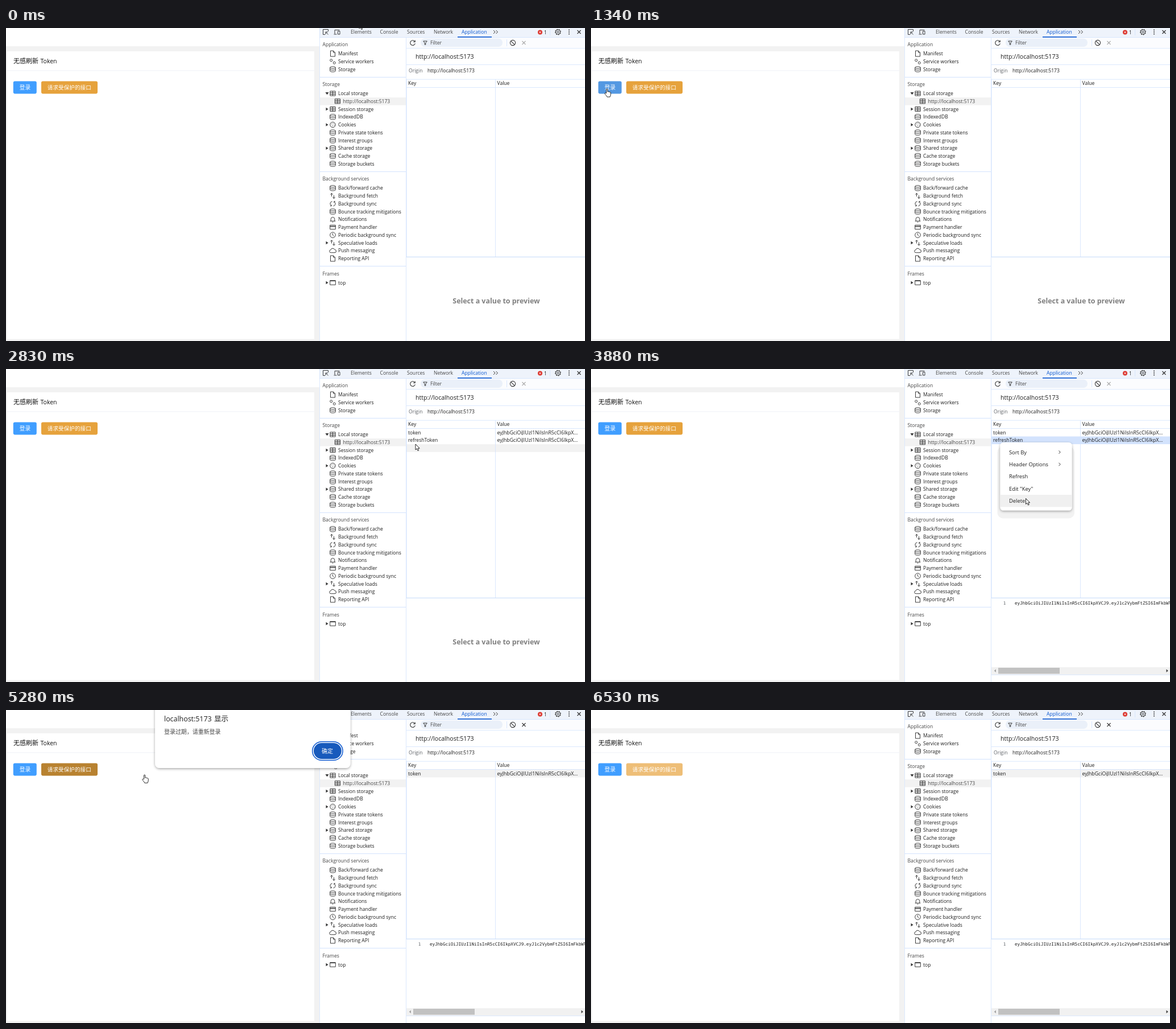
Write an HTML page that moves like this. It is 1018x550 px and loops after 6.97 s.

```html
<!DOCTYPE html>
<html lang="zh">
<head>
<meta charset="utf-8">
<title>Token refresh</title>
<style>
  html, body { margin: 0; width: 100%; height: 100%; overflow: hidden; background: #fff; }
  svg { display: block; width: 100%; height: 100%; }
  text { font-family: 'Open Sans', 'Noto Sans CJK SC', 'Noto Sans CJK', sans-serif; white-space: pre; }
  .mono { font-family: 'DejaVu Sans Mono', 'Noto Sans Mono', monospace; }
</style>
</head>
<body>
<svg id="stage" viewBox="0 0 1018 550" xmlns="http://www.w3.org/2000/svg"></svg>
<script>
const LOOP = 6970;
const UI = 8.57, CODE = 7.63;
const INK = '#1f1f1f', MUTED = '#474747', LINE = '#d3e3fd', BLUE = '#0b57d0';
const HOST = 'http://localhost:5173';
const JWT = 'eyJhbGciOiJIUzI1NiIsInR5cCI6IkpXVCJ9.eyJ1c2VybmFtZSI6ImFkbWlu';

const rect = (x, y, w, h, fill, extra = '') =>
  `<rect x="${x}" y="${y}" width="${w}" height="${h}" fill="${fill}" ${extra}/>`;
const label = (x, y, str, size = UI, fill = INK, extra = '') =>
  `<text x="${x}" y="${y}" font-size="${size}" fill="${fill}" ${extra}>${str}</text>`;
const stroke = (x, y, d, color = '#3a3a3a', width = 1, extra = '') =>
  `<path transform="translate(${x} ${y})" d="${d}" fill="none" stroke="${color}" stroke-width="${width}" ${extra}/>`;
const solid = (x, y, d, fill = '#333') =>
  `<path transform="translate(${x} ${y})" d="${d}" fill="${fill}"/>`;
const group = (id, body) => `<g id="${id}">${body}</g>`;
const ring = r => `M${-r} 0a${r} ${r} 0 1 0 ${2 * r} 0a${r} ${r} 0 1 0 ${-2 * r} 0`;
const CROSS = 'M-3-3l6 6M3-3l-6 6';

const ICONS = {
  doc: 'M-4-5h5l3 3v7h-8zM1-5v3h3',
  gears: 'M-4.8-2a2 2 0 1 0 4 0a2 2 0 1 0-4 0M.8 2.5a2 2 0 1 0 4 0a2 2 0 1 0-4 0',
  db: 'M-4.8-3c0-2.2 9.6-2.2 9.6 0v6c0 2.2-9.6 2.2-9.6 0zM-4.8-3c0 2.2 9.6 2.2 9.6 0M-4.8 0c0 2.2 9.6 2.2 9.6 0',
  table: 'M-4.6-4h9.2v8h-9.2zM-4.6-1.3h9.2M-4.6 1.4h9.2M0-4v8',
  cookie: ring(4.7) + 'M-2-1.5h1.2M1-2h1.2M-1 1.8h1.2M2 1h1.2',
  arrows: 'M-2 1v-5.5M-4.2-2.4l2.2-2.2 2.2 2.2M2-1v5.5M-.2 2.4l2.2 2.2 2.2-2.2',
  sync: 'M-1-4A4 4 0 0 0-2.5 3.5M-4.5 4h2.2v-2.2M1 4A4 4 0 0 0 2.5-3.5M4.5-4h-2.2v2.2',
  bell: 'M-3.3 3v-3.5a3.3 3.3 0 0 1 6.6 0v3.5M-4.8 3h9.6M-1 4.8h2',
  card: 'M-4.8-3.6h9.6v7.2h-9.6zM-4.8-1.6h9.6M-4.8-1h9.6',
  clock: ring(4.8) + 'M0-3v3l2 2',
  cloud: 'M-3 3.5a2.5 2.5 0 0 1-.5-5a3.6 3.6 0 0 1 6.8-.2a2.6 2.6 0 0 1 .2 5.2z',
  frame: 'M-4.8-3.8h9.6v7.6h-9.6zM-4.8-3h9.6'
};

// Each section: heading, heading centre, first item centre, items as "icon|text|arrow"
const SECTIONS = [
  ['Application', 28.5, 45, ['doc|Manifest', 'gears|Service workers', 'db|Storage']],
  ['Storage', 98.8, 115, ['table|Local storage|open', `table|${HOST}|child`, 'table|Session storage|shut',
    'db|IndexedDB', 'cookie|Cookies|shut', 'db|Private state tokens', 'db|Interest groups',
    'db|Shared storage|shut', 'db|Cache storage', 'db|Storage buckets']],
  ['Background services', 265, 281.3, ['db|Back/forward cache', 'arrows|Background fetch', 'sync|Background sync',
    'db|Bounce tracking mitigations', 'bell|Notifications', 'card|Payment handler',
    'clock|Periodic background sync', 'arrows|Speculative loads|shut', 'cloud|Push messaging', 'doc|Reporting API']],
  ['Frames', 431.5, 447.5, ['frame|top|shut']]
];

function sidebarItem(item, y) {
  const [icon, name, kind] = item.split('|');
  const dx = kind === 'child' ? 8.4 : 0;
  let out = stroke(574.5 + dx, y, ICONS[icon]) +
    label(584 + dx, y + 3.1, name, UI, dx ? MUTED : INK);
  if (kind === 'open') out += solid(564.5, y, 'M-3-2h6l-3 4.2z');
  if (kind === 'shut') out += solid(564.5, y, 'M-2-2.8l4 2.8-4 2.8z');
  return out;
}

const sidebar = () => rect(552, 122, 151, 13.6, '#f2f2f2') +
  SECTIONS.map(([title, y, first, items]) =>
    label(556.5, y + 3, title, UI, MUTED) +
    items.map((item, i) => sidebarItem(item, first + i * 13.74)).join('')).join('') +
  [86, 252, 418].map(y => rect(552, y, 151, 1, LINE)).join('');

const page = () => rect(0, 0, 551, 550, '#fff') + rect(0, 32, 551, 518, '#f2f2f2') +
  rect(2, 41, 540, 505.5, '#fff') + rect(2, 74.5, 540, 0.8, '#ebeef5') +
  label(13, 62.3, '无感刷新', 11, '#111', 'font-weight="500"') +
  label(60.5, 62.2, 'Token', 10.5, '#111', 'font-weight="500"') +
  rect(12.8, 93.4, 41, 22, '#409eff', 'id="login" rx="2.8"') + label(23.8, 107.7, '登录', 9.7, '#fff') +
  rect(62, 93.4, 99, 22, '#e6a23c', 'id="request" rx="2.8"') + label(72.8, 107.7, '请求受保护的接口', 9.65, '#fff');

const tabs = () => rect(551, 0, 467, 16.5, '#eef3fb') + rect(551, 16, 467, 0.8, LINE) +
  stroke(562, 7, 'M4.5-1v-3.5h-9v9h3.5M0 0l4.5 4.5M0 4v-4h4') +
  stroke(582, 7, 'M-4 3v-6.5h8.5M-5.5 4h5M1.5-1.5h3.5v5.5h-3.5z') +
  [[606, 'Elements'], [657.5, 'Console'], [705, 'Sources'], [752, 'Network']]
    .map(([x, s]) => label(x, 10, s, UI, MUTED)).join('') +
  label(801, 10, 'Application', UI, BLUE) + rect(794, 15, 60, 1.6, BLUE) +
  stroke(861, 7, 'M-4-3l3 3-3 3M.5-3l3 3-3 3') +
  solid(939, 7.5, ring(4), '#dc362e') + stroke(939, 7.5, 'M-1.5-1.5l3 3M1.5-1.5l-3 3', '#fff') +
  label(946, 10.5, '1') + rect(956, 2, 0.8, 11, LINE) +
  stroke(970.5, 7, ring(4) + ring(1.5)) + stroke(970.5, 7, ring(4.8), '#3a3a3a', 1.2, 'stroke-dasharray="1.9 1.87"') +
  [3.5, 7, 10.5].map(y => solid(990, y, ring(1))).join('') +
  stroke(1007.5, 7, CROSS, '#333', 1.2);

const toolbar = () => rect(704, 17, 314, 18.5, '#fbfcfe') + rect(704, 35.5, 314, 0.8, LINE) +
  stroke(715, 26, 'M3.5-2.5A4.3 4.3 0 1 0 4.3 1M4.2-4.5v3h-3', '#333', 1.1) +
  rect(729, 18.5, 144, 14.5, '#eaf0f9', 'rx="7.2"') +
  stroke(737, 26, 'M-3.3-3h6.6l-2.5 3.2v3h-1.6v-3z') + label(746, 29, 'Filter', UI, MUTED) +
  rect(880, 20, 0.8, 12, LINE) + stroke(891, 26, ring(4.6) + 'M-3.2-3.2l6.4 6.4', '#333', 1.1) +
  stroke(910.5, 26, CROSS, '#aaa', 1.1, 'id="clear"') +
  label(720, 53.5, HOST, 10.6) + rect(704, 64, 314, 0.8, LINE) +
  label(708, 77.5, 'Origin', UI, '#5f6368') + label(741, 77.5, HOST);

const tableRow = (id, y, key) =>
  group(id, label(707, y, key) + label(863.5, y, JWT.slice(0, 32) + '...', 8.75));

const table = () => rect(704, 0, 314, 13.6, '#f2f2f2', 'id="rowFill"') +
  label(707, 100, 'Key') + label(863.5, 100, 'Value') +
  tableRow('tokenRow', 114.7, 'token') + tableRow('refreshRow', 128.4, 'refreshToken') +
  rect(704, 89.8, 314, 0.8, LINE) + rect(704, 104, 314, 0.8, LINE) +
  rect(860, 90, 0.8, 312, LINE) + rect(704, 90, 0.6, 312, LINE) +
  rect(704, 401.8, 314, 1, '#c4d9fb') + rect(703, 17, 0.8, 533, LINE) + rect(551, 0, 0.8, 550, LINE);

const preview = () =>
  group('hint', label(862, 483.5, 'Select a value to preview', 12.43, '#808080', 'font-weight="700" text-anchor="middle"')) +
  group('content', label(724.7, 414, '1', CODE, '#5f6368', 'class="mono"') +
    label(745, 414, JWT, CODE, INK, 'class="mono"') +
    rect(704, 524, 314, 13, '#f1f1f1') + rect(716, 525, 108, 10.5, '#c1c1c1') +
    solid(710, 530.3, 'M2-2.8v5.6l-3.3-2.8z', '#a3a3a3') + solid(1013, 530.3, 'M-1.5-2.8v5.6l3.3-2.8z', '#404040') +
    rect(704, 537, 314, 0.8, LINE));

const MENU = ['Sort By', 'Header Options', 'Refresh', 'Edit "Key"', 'Delete'];
const MENU_TOP = 135.4, MENU_STEP = 21.4;
const menu = () => group('menu',
  rect(714.5, 136, 135.5, 126.5, '#000', 'rx="10" opacity=".05"') +
  rect(719.5, 129, 126, 119.5, '#fff', 'rx="5.5" filter="url(#soft)"') +
  rect(719.5, 0, 126, MENU_STEP, '#f0f0f0', 'id="menuFill"') +
  MENU.map((s, i) => {
    const y = MENU_TOP + (i + 0.5) * MENU_STEP;
    return label(735, y + 3.5, s, 9.34) + (i < 2 ? stroke(824, y, 'M-1.5-2.7l2.7 2.7-2.7 2.7', '#333') : '');
  }).join(''));

const dialog = () => group('dialog',
  rect(262, -20, 343.5, 122, '#fff', 'rx="8" filter="url(#soft)"') +
  label(278, 20.2, 'localhost:5173', 12.4) + label(366, 20.4, '显示', 12.5) +
  label(278, 42.2, '登录过期，请重新登录', 9.95, MUTED) +
  rect(538.7, 55.7, 53.4, 32.6, '#fff', `rx="16.3" stroke="${BLUE}" stroke-width="1.5"`) +
  rect(541, 58, 48.8, 28, '#185abc', 'rx="14"') + label(555, 75.8, '确定', 10, '#fff'));

const CURSOR_STYLE = 'fill="#fff" stroke="#111" stroke-width=".9"';
const cursor = () => group('cursor',
  `<path id="arrow" d="M0 0V10L2.3 7.9L4 11.6L5.7 10.9L4.2 7.3H7.2Z" ${CURSOR_STYLE}/>` +
  `<path id="hand" d="M-1 8V1.4a1.1 1.1 0 0 1 2.2 0V5.6c.6-.9 1.8-.7 2 .3 .5-.6 1.6-.4 1.8.5 .7-.4 1.7 0 1.7 1V10.2c0 2-1 2.5-1.3 4.4H.2C-.2 12.6-3.5 10-3.7 8.7c-.2-1 .9-1.7 1.7-.8Z" ${CURSOR_STYLE}/>`);

const stage = document.getElementById('stage');
stage.innerHTML =
  `<defs><filter id="soft" x="-20%" y="-20%" width="140%" height="150%">
    <feDropShadow dx="0" dy="1.5" stdDeviation="2" flood-opacity=".36"/></filter></defs>` +
  page() + rect(551, 0, 467, 550, '#fff') + tabs() + sidebar() + toolbar() + table() + preview() +
  menu() + dialog() + cursor();

const el = {};
stage.querySelectorAll('[id]').forEach(node => { el[node.id] = node; });

// Pointer moves: start, end, number of steps, Bezier points
const MOVES = [
  [320, 1000, 15, [[621, -9], [720, 130], [230, 240], [30, 111]]],
  [1060, 1060, 1, [[30, 111], [28, 106.5]]],
  [1610, 2270, 13, [[28, 106.5], [40, 205], [110, 200], [155, 138]]],
  [2320, 2830, 11, [[155, 138], [430, 112], [720, 132]]],
  [2970, 2970, 1, [[720, 132], [720, 131]]],
  [3520, 3880, 8, [[720, 131], [735, 190], [764.5, 227.5]]],
  [4230, 4450, 6, [[764.5, 227.5], [480, 160], [211, 135]]],
  [4500, 4700, 5, [[211, 135], [150, 125], [115, 105]]],
  [5130, 5280, 4, [[115, 105], [243.5, 113.6]]],
  [5530, 5840, 7, [[243.5, 113.6], [420, 112], [573, 82]]],
  [6060, 6530, 11, [[573, 82], [650, 75], [729, -16]]]
];

const lerp = (a, b, k) => a + (b - a) * k;
function bezier(pts, k) {
  while (pts.length > 1)
    pts = pts.slice(1).map((p, i) => [lerp(pts[i][0], p[0], k), lerp(pts[i][1], p[1], k)]);
  return pts[0];
}

function pointerAt(t) {
  const move = MOVES.filter(m => t >= m[0]).pop();
  if (!move) return MOVES[0][3][0];
  const [start, end, steps, pts] = move;
  const step = t >= end ? steps : 1 + Math.floor((t - start) / (end - start) * (steps - 1));
  const k = step / steps;
  return bezier(pts, k * k * (3 - 2 * k));
}

const show = (node, on) => node.setAttribute('display', on ? 'inline' : 'none');
const inside = ([x, y], left, top, right, bottom) => x >= left && x <= right && y >= top && y <= bottom;

function render(t) {
  const during = (a, b) => t >= a && t < b;
  const loggedIn = t >= 1420, selected = t >= 3110, deleted = t >= 4180;
  const menuOpen = during(3210, 4180), alertOpen = during(5180, 6010);
  const pos = pointerAt(t);
  const overLogin = inside(pos, 13, 93, 54, 115.5);
  const overRequest = inside(pos, 62, 93, 161, 115.5);
  const overAlert = alertOpen && inside(pos, 262, 0, 606, 102);

  el.cursor.setAttribute('transform', `translate(${pos})`);
  const hand = overLogin || overRequest || (alertOpen && !overAlert);
  show(el.hand, hand);
  show(el.arrow, !hand);

  el.login.setAttribute('fill', during(1340, 1420) ? '#5398e2' : overLogin ? '#79bbff' : '#409eff');
  el.request.setAttribute('fill', during(5080, 6010) ? '#b88230' :
    overRequest || t >= 6010 ? '#eebe77' : '#e6a23c');

  show(el.tokenRow, loggedIn);
  show(el.refreshRow, loggedIn && !deleted);
  const hoverRow = loggedIn && inside(pos, 704, 105, 1018, 146) ? Math.floor((pos[1] - 104.6) / 13.7) : -1;
  const row = deleted ? 0 : selected ? 1 : hoverRow;
  show(el.rowFill, row >= 0);
  el.rowFill.setAttribute('y', 104.8 + Math.max(row, 0) * 13.7);
  el.rowFill.setAttribute('fill', selected && !deleted ? '#d3e3fd' : '#f2f2f2');
  el.clear.setAttribute('stroke', deleted ? '#333' : '#aaa');

  show(el.hint, !selected);
  show(el.content, selected);
  show(el.menu, menuOpen);
  const item = Math.floor((pos[1] - MENU_TOP) / MENU_STEP);
  show(el.menuFill, item >= 0 && item < MENU.length);
  el.menuFill.setAttribute('y', MENU_TOP + item * MENU_STEP);
  show(el.dialog, alertOpen);
}

const started = performance.now();
function tick() {
  render((performance.now() - started) % LOOP);
  requestAnimationFrame(tick);
}
tick();
</script>
</body>
</html>
```
